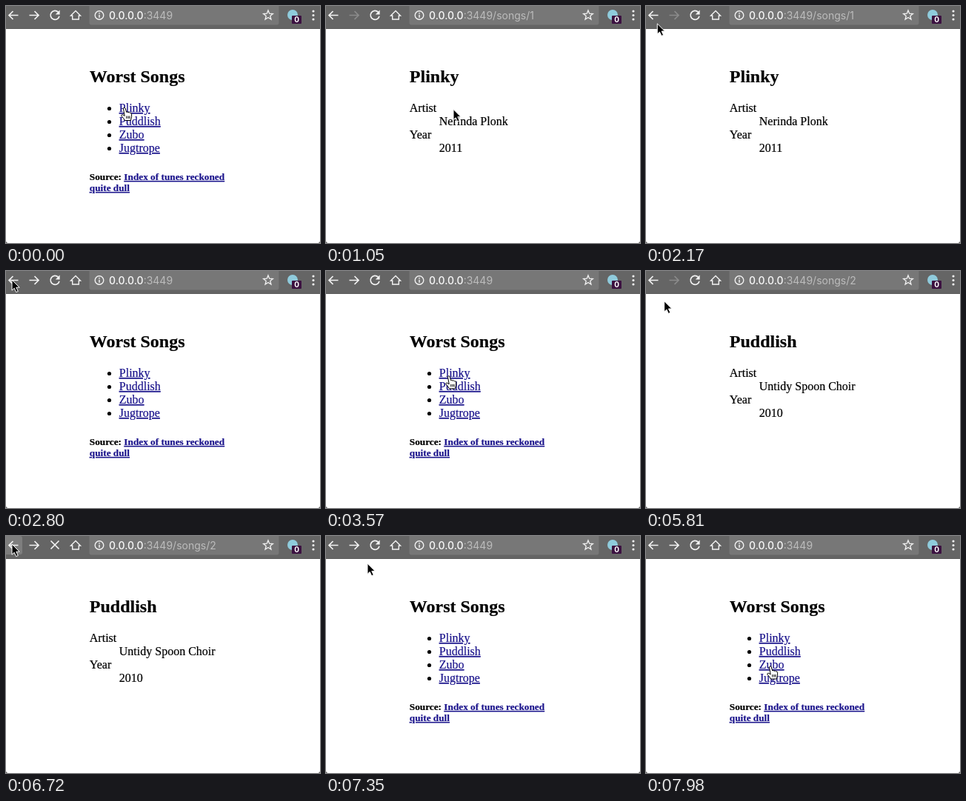
Recreate the animation shown at these times as an HTML page. Size 424x320 px, loop 8 s.

```html
<!DOCTYPE html>
<html lang="en">
<head>
<meta charset="utf-8">
<title>Worst Songs</title>
<style>
  html, body { margin: 0; width: 100%; height: 100%; overflow: hidden; background: #fff; }
  svg { display: block; width: 424px; height: 320px; }
  text { white-space: pre; }
  .page { font: 16px "Liberation Serif", serif; fill: #000; }
  .page text { stroke: #000; stroke-width: .2; }
  .h1 { font-size: 24px; font-weight: bold; }
  .h5 { font-size: 13.28px; font-weight: bold; }
  .page .link { fill: #1b148c; stroke: #1b148c; text-decoration: underline; }
  .url { font: 500 14px Inter, sans-serif; fill: #f8f8f8; }
  .url .dim { font-weight: 400; fill: #bcbcbc; }
  .icon { fill: none; stroke: #f2f2f2; stroke-width: 1.7; }
  .badge { font: bold 10px Inter, sans-serif; fill: #fff; text-anchor: middle; }
</style>
</head>
<body>
<svg viewBox="0 0 424 320">
  <rect width="424" height="320" fill="#fff"/>

  <g id="list" class="page">
    <text class="h1" x="112.8" y="103">Worst Songs</text>
    <g id="items"></g>
    <text class="h5" x="112.8" y="235">Source: <tspan class="link">Index of tunes reckoned</tspan></text>
    <text class="h5 link" x="112.8" y="250">quite dull</text>
  </g>

  <g id="song" class="page">
    <text id="title" class="h1" x="112.8" y="103"></text>
    <text x="112.8" y="143">Artist</text>
    <text id="artist" x="152.8" y="161"></text>
    <text x="112.8" y="179">Year</text>
    <text id="year" x="152.8" y="197"></text>
  </g>

  <rect width="424" height="31" fill="#656565"/>
  <rect y="30" width="424" height="1" fill="#5a5a5a"/>
  <rect id="glow" x="-3" y="0" width="25" height="25" rx="3"/>
  <rect x="112.5" y="-4" width="256" height="29.5" rx="3" fill="#777"/>

  <g class="icon">
    <path d="M16.5 12.5H4M9.5 7L4 12.5L9.5 18"/>
    <path id="forward" d="M31.5 12.5H44M38.5 7L44 12.5L38.5 18"/>
    <g id="reload">
      <path d="M70.4 8.1A6 6 0 1 0 72 13.8"/>
      <path d="M72.6 5.6V11.4H66.8Z" fill="#f2f2f2" stroke="none"/>
    </g>
    <path id="stop" d="M60.5 6.5L71.5 17.5M71.5 6.5L60.5 17.5"/>
    <path d="M87.5 13L94 6.5L100.5 13H98.3V18H89.7V13Z" stroke-width="1.4"/>
    <circle cx="126" cy="12.5" r="5.8" stroke-width="1.4"/>
    <path d="M126 11.8V15.8M126 9V10.5" stroke-width="1.5"/>
    <path id="star" stroke-width="1.3"/>
  </g>
  <text class="url" x="139" y="18">0.0.0.0<tspan class="dim">:3449<tspan id="path"></tspan></tspan></text>

  <circle cx="387" cy="12" r="7" fill="#8fcbdc"/>
  <rect x="386" y="13" width="13" height="11" rx="1" fill="#3b1140"/>
  <text class="badge" x="392.5" y="22.2">0</text>
  <path d="M415 7h0M415 12.5h0M415 18h0" stroke="#f2f2f2" stroke-width="3.2" stroke-linecap="round"/>
  <path d="M0 317.5V320H2.5Q.5 319.5 0 317.5M424 317.5V320H421.5Q423.5 319.5 424 317.5" fill="#555"/>

  <g id="cursor">
    <path id="arrow" d="M0 0V14.2L3.2 11.2L5.7 16.6L8.3 15.4L5.8 10.2H10.2Z" fill="#000" stroke="#fff"/>
    <path id="hand" fill="#fff" stroke="#000" stroke-linejoin="round"
      d="M-1.6 1.2Q-.2 -.6 1.2 1.2L2.6 6.4Q3.8 5.2 5 6.8Q6.4 5.8 7.4 7.4Q9.2 6.8 9.6 8.8Q10.2 12.5 8.4 17.5H.4Q-1 14.4-4.2 11.4Q-4.4 9.2-2.2 9.8L.2 11.4ZM2.8 11.5V15M5 11.5V15M7 11.5V15"/>
    <g id="beam" fill="none">
      <path id="bar" d="M-3.5 -7.5Q0 -7.5 0 -5V5Q0 7.5 -3.5 7.5M3.5 -7.5Q0 -7.5 0 -5V5Q0 7.5 3.5 7.5M-2 2H2" stroke="#fff" stroke-width="2.6"/>
      <path id="core" stroke="#000" stroke-width="1.2"/>
    </g>
  </g>
</svg>

<script>
const LOOP = 8000, STEP = 70;
const el = id => document.getElementById(id);
const set = (id, name, value) => el(id).setAttribute(name, value);
const show = (id, on) => set(id, "visibility", on ? "visible" : "hidden");

const songs = [
  { title: "Plinky", artist: "Nerinda Plonk", year: "2011" },
  { title: "Puddlish", artist: "Untidy Spoon Choir", year: "2010" },
  { title: "Zubo" },
  { title: "Jugtrope" }
];

el("items").innerHTML = songs.map((s, i) =>
  `<circle cx="139.5" cy="${138.5 + 18 * i}" r="2.6"/>` +
  `<text class="link" x="152.8" y="${143 + 18 * i}">${s.title}</text>`).join("");

set("star", "d", "M" + Array.from({ length: 10 }, (_, i) => {
  const r = i % 2 ? 2.9 : 6.7, a = i * Math.PI / 5;
  return (354 + r * Math.sin(a)).toFixed(2) + " " + (12.6 - r * Math.cos(a)).toFixed(2);
}).join("L") + "Z");
set("core", "d", el("bar").getAttribute("d"));

// Page 0 is the list; other numbers are songs.
const clicks = [
  { time: -LOOP, page: 0 },
  { time: 420, page: 1 },
  { time: 2520, page: 0 },
  { time: 4200, page: 2 },
  { time: 6650, page: 0 }
];
const RESPOND = 70, SWAP = 140, LOADED = 280;
const clickAt = t => clicks.filter(c => c.time <= t).pop() || clicks[0];

const home = { x: 160, y: 137 };
const moves = [
  { from: 0, to: 210, x: 172, y: 139.5 },
  { from: 1540, to: 2380, x: 8, y: 12 },
  { from: 2870, to: 3710, x: 168, y: 145 },
  { from: 3710, to: 3920, x: 170, y: 157 },
  { from: 5250, to: 6090, x: 8, y: 11 },
  { from: 7000, to: 7910, x: 168, y: 175.5 }
];

const ease = k => k < .5 ? 4 * k ** 3 : 1 - 4 * (1 - k) ** 3;

// Eased moves along a slight arc.
function place(t) {
  let { x, y } = home;
  for (const m of moves) {
    if (t <= m.from) break;
    const k = ease(Math.min(1, (t - m.from) / (m.to - m.from)));
    const dx = m.x - x, dy = m.y - y, bow = .4 * k * (1 - k);
    x += dx * k + dy * bow;
    y += dy * k - dx * bow;
  }
  return { x, y };
}

function cursorKind({ x, y }, page) {
  if (x < 151) return "arrow";
  if (!page) return y > 128 && y < 203 ? "hand" : "arrow";
  return y > 148 ? "beam" : "arrow";
}

function draw(ms) {
  const t = Math.floor((ms % LOOP) / STEP) * STEP;
  const page = clickAt(t - SWAP).page;
  const answer = clickAt(t - RESPOND);
  const busy = t - answer.time < LOADED;
  const pos = place(t), kind = cursorKind(pos, clickAt(t - 2 * SWAP).page);

  show("list", !page);
  show("song", page);
  if (page) for (const key of ["title", "artist", "year"]) el(key).textContent = songs[page - 1][key];
  el("path").textContent = page ? "/songs/" + page : "";

  show("reload", !busy);
  show("stop", busy);
  set("forward", "stroke", answer.page ? "#8b8b8b" : "#f2f2f2");
  show("glow", page && pos.x < 22 && pos.y < 20);
  set("glow", "fill", busy ? "#7e7e7e" : "#727272");

  for (const id of ["arrow", "hand", "beam"]) show(id, id === kind);
  set("cursor", "transform", `translate(${pos.x} ${pos.y})`);
}

const start = performance.now();
function tick() {
  draw(performance.now() - start);
  requestAnimationFrame(tick);
}
draw(0);
requestAnimationFrame(tick);
</script>
</body>
</html>
```
